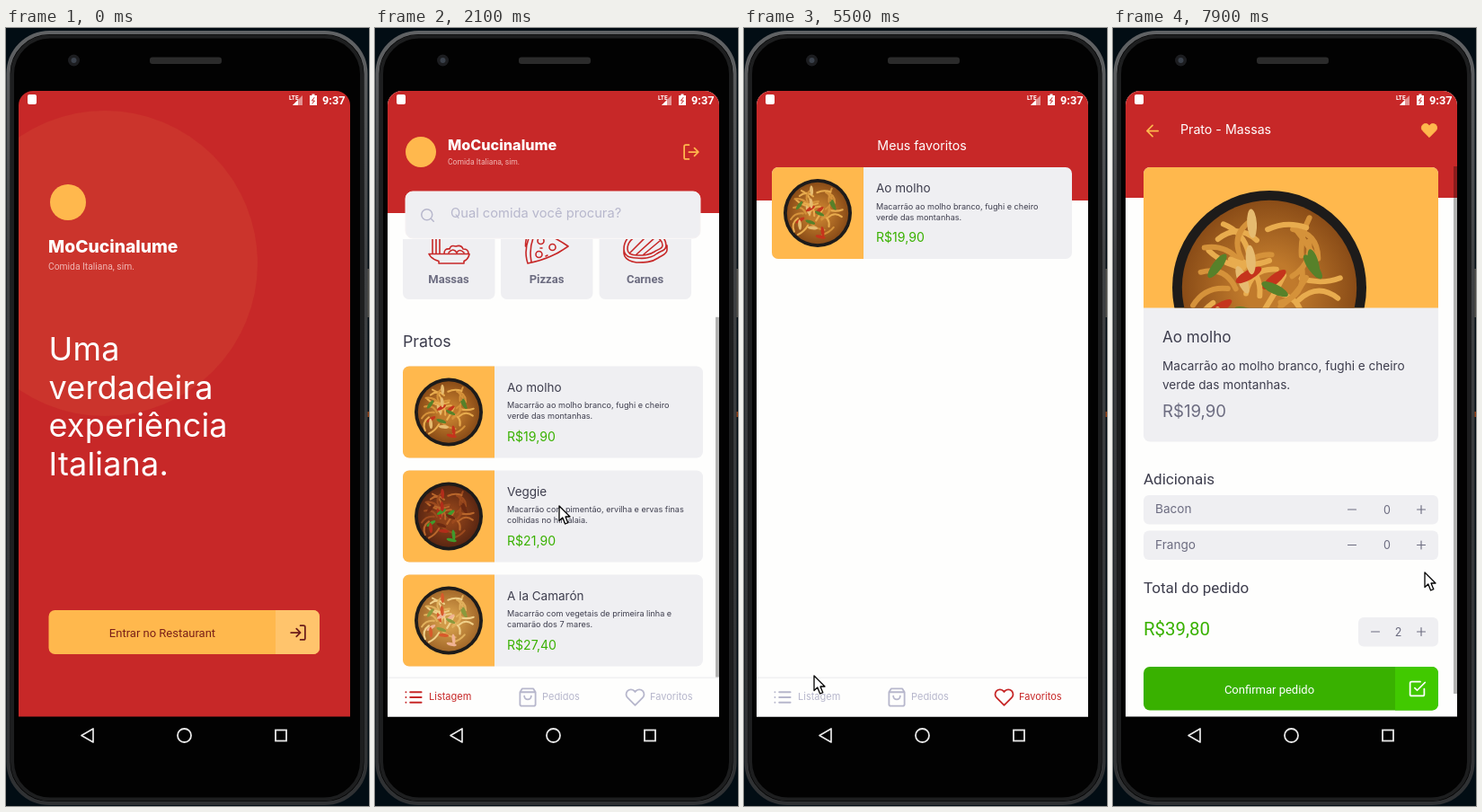
Recreate the animation shown at these times as an HTML page. Size 404 by 866 pixels, loop 8 s.

```html
<!DOCTYPE html>
<html lang="pt">
<head>
<meta charset="utf-8">
<title>Restaurante</title>
<style>
html, body { margin: 0; width: 100%; height: 100%; overflow: hidden; background: #020d14; }
svg { display: block; width: 404px; height: 866px; }
text { font-family: Inter, "Open Sans", sans-serif; white-space: pre; }
.r { font-family: Roboto, Arial, sans-serif; }
</style>
</head>
<body>
<svg id="stage" viewBox="0 0 404 866" xmlns="http://www.w3.org/2000/svg"></svg>
<script>
const RED = '#c72828', GOLD = '#ffb84d', GREY = '#efeff2', INK = '#3d3d4d',
      MUTED = '#6c6c80', PALE = '#b7b7cc', GREEN = '#39b100', PAPER = '#fefefd';
const BRAND = 'MoCucinalume';

// ---- drawing helpers ----
const rect = (x, y, w, h, fill, rx = 0, more = '') =>
  `<rect x="${x}" y="${y}" width="${w}" height="${h}" rx="${rx}" fill="${fill}" ${more}/>`;
const circle = (x, y, r, fill, more = '') =>
  `<circle cx="${x}" cy="${y}" r="${r}" fill="${fill}" ${more}/>`;
const text = (x, y, s, size, fill, more = '') =>
  `<text x="${x}" y="${y}" font-size="${size}" fill="${fill}" ${more}>${s}</text>`;
const roboto = (x, y, s, size, fill, more = '') => text(x, y, s, size, fill, 'class="r" ' + more);
const line = (d, color, width = 1.5, fill = 'none') =>
  `<path d="${d}" fill="${fill}" stroke="${color}" stroke-width="${width}" stroke-linecap="round" stroke-linejoin="round"/>`;
const group = (id, body, more = '') => `<g id="${id}" ${more}>${body}</g>`;
const scrollbar = (y, h, more = '') => rect(379, y, 4, h, '#000', 0, 'fill-opacity=".3" ' + more);
const MID = 'text-anchor="middle"';

const ICONS = {
  heart: 'M20.8 4.6a5.5 5.5 0 0 0-7.8 0L12 5.7l-1-1.1a5.5 5.5 0 0 0-7.8 7.8L12 21.2l8.8-8.8a5.5 5.5 0 0 0 0-7.8z',
  bag: 'M5.5 2L3 6v14a2 2 0 0 0 2 2h14a2 2 0 0 0 2-2V6l-2.5-4zM3 6h18M16 10.5a4 4 0 0 1-8 0',
  list: 'M8 6h13M8 12h13M8 18h13M3 6h.1M3 12h.1M3 18h.1',
  enter: 'M15 3h4a2 2 0 0 1 2 2v14a2 2 0 0 1-2 2h-4M10 17l5-5-5-5M15 12H3',
  leave: 'M9 21H5a2 2 0 0 1-2-2V5a2 2 0 0 1 2-2h4M16 17l5-5-5-5M21 12H9',
  find: 'M3 11a8 8 0 1 0 16 0a8 8 0 1 0-16 0M21 21l-4.3-4.3',
  back: 'M19 12H5M12 19l-7-7 7-7',
  check: 'M9 11l3 3L22 4M21 12v7a2 2 0 0 1-2 2H5a2 2 0 0 1-2-2V5a2 2 0 0 1 2-2h11',
  plus: 'M12 6v12M6 12h12',
  minus: 'M6 12h12'
};
function icon(name, cx, cy, size, color, fill = 'none', width = 2) {
  const k = size / 24;
  return `<g transform="translate(${cx - size / 2} ${cy - size / 2}) scale(${k})">${line(ICONS[name], color, width, fill)}</g>`;
}

function seeded(seed) {
  return () => (seed = (seed * 16807) % 2147483647) / 2147483647;
}

// base, shade, strands, toppings
const FOOD = {
  sauce: ['#c07a2c', '#8a4c17', ['#e8ac4e', '#d5923a'], ['#c5341c', '#e6bb70', '#57812a']],
  veg: ['#8c4119', '#5c2712', ['#b9662b', '#9c4a1e'], ['#3f9a2d', '#b22d1a', '#6b2a12']],
  shrimp: ['#d19a48', '#a4692a', ['#f0d08a', '#e1b05c'], ['#f0b394', '#d85a2b', '#8a9a3c']]
};
function plate(cx, cy, r, kind, seed) {
  const [, , strands, bits] = FOOD[kind], rnd = seeded(seed);
  const place = () => {
    const a = rnd() * 6.283, d = Math.sqrt(rnd()) * r * 0.74;
    return `transform="translate(${cx + d * Math.cos(a)} ${cy + d * Math.sin(a)}) rotate(${rnd() * 180})"`;
  };
  let s = circle(cx, cy, r, '#1d1b1a') + circle(cx, cy, r * 0.9, `url(#${kind})`);
  for (let i = 0; i < 26; i++) {
    const w = r * 0.2, q = w * (rnd() - 0.5) * 1.8;
    s += `<path d="M${-w} 0Q0 ${q} ${w} 0" ${place()} fill="none" stroke="${strands[i % 2]}" stroke-width="${r * 0.055}" stroke-linecap="round"/>`;
  }
  for (let i = 0; i < 15; i++) {
    s += `<ellipse rx="${r * 0.15}" ry="${r * 0.05}" ${place()} fill="${bits[i % 3]}"/>`;
  }
  return s;
}

const DISHES = {
  sauce: ['Ao molho', 'Macarrão ao molho branco, fughi e cheiro', 'verde das montanhas.', '19,90'],
  veg: ['Veggie', 'Macarrão com pimentão, ervilha e ervas finas', 'colhidas no himalaia.', '21,90'],
  shrimp: ['A la Camarón', 'Macarrão com vegetais de primeira linha e', 'camarão dos 7 mares.', '27,40']
};
function dish(y, kind, price) {
  const [name, a, b, cost] = DISHES[kind];
  return rect(31, y, 334, 102, GREY, 7) +
    `<path d="M133 ${y}H38a7 7 0 0 0-7 7v88a7 7 0 0 0 7 7h95z" fill="${GOLD}"/>` +
    plate(82, y + 51, 38, kind, 77) +
    text(147, y + 28, name, 13.5, INK) +
    text(147, y + 46.5, a, 9.1, INK) + text(147, y + 58.5, b, 9.1, INK) +
    text(147, y + 83, 'R$' + (price || cost), 14.1, GREEN);
}

function tabs(active) {
  const items = [['list', 43, 60, 'Listagem'], ['bag', 170, 186, 'Pedidos'], ['heart', 289.5, 306, 'Favoritos']];
  return rect(14, 722.5, 369, 2, '#f1f1f2') + rect(14, 724, 369, 43, PAPER) +
    items.map(([ic, x, tx, label], i) => {
      const c = i === active ? RED : PALE;
      return icon(ic, x, 745, 23, c, 'none', 1.9) + text(tx, 748, label, 11, c);
    }).join('');
}

const page = headEnd => rect(14, 70, 369, 697, PAPER) + rect(14, 70, 369, headEnd - 70, RED);

// ---- screens ----
const heading = ['Uma', 'verdadeira', 'experiência', 'Italiana.'];
const welcome = rect(14, 70, 369, 697, RED) +
  circle(110, 262, 170, '#cb342c') + circle(69, 194, 20, GOLD) +
  text(47, 250, BRAND, 19.3, '#fff', 'font-weight="800"') +
  roboto(47, 268.5, 'Comida Italiana, sim.', 10.3, '#f0b7b4') +
  heading.map((s, i) => text(47.5, 370 + i * 42.7, s, 36, '#fff', 'letter-spacing=".005em"')).join('') +
  group('enter', rect(47.5, 648, 301.5, 49, GOLD, 7) +
    '<path d="M300 648h42a7 7 0 0 1 7 7v35a7 7 0 0 1-7 7h-42z" fill="#ffc46c"/>' +
    roboto(174, 678, 'Entrar no Restaurant', 13, '#7a2018', MID) +
    icon('enter', 325, 673, 21, '#6b1d1a'));

const pasta = 'M59 332h13q5 0 8 1.5h25v3h-25q-3 2.5-8 2.5h-13M59 335.5h13M64 330v28M68 330v28M72 330v28M60 358.5h45q-1 6-6 8v2.5h-28v-2.5q-8-2-11-8zM77 358q0-6 6-5q1-5 7-3q6-2 8 3q6 0 6 5M82 357q5-6 9 0q3-5 8 0';
const pizza = 'M176 331q22 7 39 19q-19 14-45 19q-6-18 6-38zM179.5 334q-9 15-5.5 33M167.5 350q0-15 8.5-19M181 344a3.5 3.5 0 1 0 7 0a3.5 3.5 0 1 0-7 0M179 359a3.5 3.5 0 1 0 7 0a3.5 3.5 0 1 0-7 0M194 351a3.5 3.5 0 1 0 7 0a3.5 3.5 0 1 0-7 0M190 338l2 1M190 361l2-1M184 352h2';
const meat = 'M277 353c0-13 12-21 26-20c13 0 21 8 21 16c0 6-6 6-10 9c-6 5-14 6-23 5c-9 0-14-3-14-10zM277 353v5c1 7 7 9 14 10c9 0 17 0 24-5c4-3 10-4 10-9v-5M281 353c0-10 10-17 22-16c10 0 17 6 17 12c0 4-5 4-9 7c-6 4-12 4-19 4c-7 0-11-2-11-7zM284 357l19-19M291 359l21-19M299 359l18-15';
const category = (x, label, art, id) => group(id,
  rect(x, 307, 102.5, 102, GREY, 7, `id="${id}Box"`) + line(art, RED, 1.6) +
  roboto(x + 51, 391, label, 13, MUTED, MID + ' font-weight="700"'));

const home = page(206) + circle(51, 138, 17, GOLD) +
  text(81, 136, BRAND, 16.2, '#fff', 'font-weight="800"') +
  roboto(81, 152, 'Comida Italiana, sim.', 8.6, '#f0b7b4') +
  icon('leave', 352, 138, 21, GOLD) +
  rect(34, 182, 328, 52, GREY, 8, 'stroke="#f5f1f1"') +
  icon('find', 58.5, 208.5, 18, PALE) +
  text(84, 211, 'Qual comida você procura?', 14.7, PALE) +
  '<g clip-path="url(#scroll)">' + group('list',
    text(31, 286, 'Categorias', 17.8, INK) +
    group('cats', category(31, 'Massas', pasta, 'massas') + category(140, 'Pizzas', pizza, 'pizzas') +
      category(249.5, 'Carnes', meat, 'carnes')) +
    text(31, 462, 'Pratos', 17.8, INK) +
    group('all', dish(483.5, 'sauce') + dish(599.5, 'veg') + dish(715.5, 'shrimp')) +
    group('only', dish(483.5, 'veg'))) + '</g>' +
  scrollbar(234, 402, 'id="bar"') + tabs(0);

const title = s => text(198, 136, s, 14.2, '#fff', MID);
const orders = page(192) + title('Meus pedidos') +
  group('orderRows', dish(155, 'sauce', '23,40') + dish(271.5, 'veg') + dish(387.5, 'shrimp') + dish(503.5, 'shrimp', '53,30')) + tabs(1);
const favs = page(192) + title('Meus favoritos') + group('favRows', dish(155, 'sauce')) + tabs(2);

const counter = (y, x0, xn, n, id) => icon('minus', x0, y, 18, MUTED, 'none', 1.5) +
  text(xn, y + 4.5, n, 12.5, MUTED, `${MID} id="${id}"`) + icon('plus', 343, y, 18, MUTED, 'none', 1.5);
const extra = (y, label, id) => rect(34, y, 328, 32.5, GREY, 6) +
  text(47, y + 20, label, 13.6, MUTED) + counter(y + 16, 266, 305, 0, id);
const [name, desc1, desc2, cost] = DISHES.sauce;
const detail = page(189) + icon('back', 44, 114.5, 21, GOLD) +
  text(75, 118, 'Prato - Massas', 14.2, '#fff') +
  group('like', icon('heart', 352, 114, 20, GOLD, 'none', 2.3)) +
  group('liked', icon('heart', 352, 114, 20, GOLD, GOLD, 1)) +
  rect(34, 155, 328, 305.5, GREY, 7) +
  `<path d="M34 311.5V162a7 7 0 0 1 7-7h314a7 7 0 0 1 7 7v149.5z" fill="${GOLD}"/>` +
  '<g clip-path="url(#photo)">' + plate(174, 289, 108, 'sauce', 77) + '</g>' +
  text(55, 350, name, 17.1, INK) + text(55, 380.5, desc1, 13.6, INK) + text(55, 402, desc2, 13.6, INK) +
  text(55, 433, 'R$' + cost, 18.6, MUTED) +
  roboto(34, 507.5, 'Adicionais', 17, INK) + extra(520, 'Bacon', 'bacon') + extra(559.5, 'Frango', 'frango') +
  roboto(34, 628.5, 'Total do pedido', 17, INK) +
  roboto(34, 675.5, '', 20.4, GREEN, 'id="total"') +
  rect(273, 656, 89, 32.5, GREY, 6) + counter(672, 292, 317.5, 1, 'qty') +
  rect(34, 711, 328, 48.5, GREEN, 7) +
  '<path d="M314 711h41a7 7 0 0 1 7 7v34.5a7 7 0 0 1-7 7h-41z" fill="#41c900"/>' +
  roboto(174, 741, 'Confirmar pedido', 13, '#fff', MID) + icon('check', 338.5, 735.5, 21, '#fff') +
  scrollbar(154, 587);

const status = rect(24, 74, 10, 11, '#fff', 2) +
  roboto(315, 79.5, 'LTE', 6.5, '#fff', 'font-weight="700"') +
  '<path d="M319 86L330 75V86z" fill="#e39393"/><path d="M319 86l6-6v6z" fill="#fff"/>' +
  '<path d="M338 75h2.5v-1.5h3V75h2.5v11h-8z" fill="#fff"/>' + line('M343 77.5l-2.5 3.5h3l-2.5 3', RED, 1) +
  roboto(352, 84.5, '9:37', 12.8, '#fff', 'font-weight="700"');

const phone = rect(0, 0, 404, 866, '#020d14') +
  rect(401, 268, 3, 54, '#4c4c48') + rect(401, 427, 3, 6, '#8a3a10') +
  rect(2.5, 5, 398, 858, '#000', 46, 'stroke="url(#metal)" stroke-width="4"') +
  rect(7, 9.5, 389, 849, '#020202', 42, 'stroke="#1d1e1f" stroke-width="4"') +
  rect(160, 32.5, 80, 7.5, '#2b2b2b', 3) +
  circle(75.5, 36, 6.5, '#1c1d20') + circle(75.5, 36, 3, '#3a414b') +
  line('M97 780v15l-13-7.5z', '#e8e8e8', 1.7) + circle(198.5, 787.5, 7.5, 'none', 'stroke="#e8e8e8" stroke-width="1.8"') +
  rect(300, 781.5, 12, 12, 'none', 0, 'stroke="#e8e8e8" stroke-width="1.8"');

const gradients = Object.entries(FOOD).map(([k, [base, shade]]) =>
  `<radialGradient id="${k}"><stop offset=".3" stop-color="${base}"/><stop offset="1" stop-color="${shade}"/></radialGradient>`).join('');
const clip = (id, body) => `<clipPath id="${id}">${body}</clipPath>`;

document.getElementById('stage').innerHTML = '<defs>' + gradients +
  '<linearGradient id="metal" x2="0" y2="1"><stop stop-color="#606264"/><stop offset=".3" stop-color="#3f4143"/><stop offset="1" stop-color="#2f3133"/></linearGradient>' +
  clip('glass', '<path d="M14 766.5V86a16 16 0 0 1 16-16h337a16 16 0 0 1 16 16v680.5z"/>') +
  clip('scroll', rect(14, 235, 369, 489, '#000')) + clip('photo', rect(34, 155, 328, 156.5, '#000')) + '</defs>' +
  phone + '<g clip-path="url(#glass)">' +
  group('welcome', welcome) + group('home', home) + group('orders', orders) + group('favs', favs) + group('detail', detail) +
  status + '</g>' +
  group('cursor', '<path d="M0 0V16.5L3.8 13L6.6 20L9.8 18.7L7 12H12z" fill="#fff" stroke="#000" stroke-width="1.3" stroke-linejoin="round"/>');

// ---- motion: rows of time, values ----
const POINTER = [[0, 420, 0], [100, 391, 24], [300, 322, 330], [600, 206, 655], [1200, 206, 655], [1500, 205, 639],
  [1600, 205, 639], [2000, 205, 532], [2100, 205, 532], [2500, 205, 639], [2800, 180, 340], [3200, 175, 332],
  [3400, 175, 332], [3800, 196, 742], [4000, 196, 742], [4200, 254, 750], [4600, 300, 747], [4700, 300, 747],
  [5200, 80, 735], [5400, 79, 735], [5500, 78, 721], [6200, 110, 525], [6400, 110, 525], [6700, 201, 560],
  [6900, 347, 108], [7000, 347, 108], [7300, 344, 683], [7500, 342, 672], [7700, 342, 672], [7900, 347, 606]];
const SCROLL = [[1600, 0], [2000, 107], [2100, 107], [2500, 0]];
const HOME_IN = [[700, 0], [800, .2], [1000, .9], [1100, 1]];
const DETAIL_IN = [[6400, 0], [6500, .4], [6600, .9], [6700, 1]];

function at(track, t) {
  const i = track.findIndex(k => k[0] >= t);
  if (i < 0) return track[track.length - 1].slice(1);
  if (i === 0) return track[0].slice(1);
  const a = track[i - 1], b = track[i], u = (t - a[0]) / (b[0] - a[0]);
  return a.slice(1).map((v, j) => v + (b[j + 1] - v) * u);
}

const el = id => document.getElementById(id);
const set = (id, key, value) => el(id).setAttribute(key, value);
const show = (id, on) => set(id, 'display', on ? 'inline' : 'none');
const move = (id, x, y) => set(id, 'transform', `translate(${x} ${y})`);
const within = (t, a, b) => t >= a && t < b;

function render(t) {
  const [homeIn] = at(HOME_IN, t), [detailIn] = at(DETAIL_IN, t), [scroll] = at(SCROLL, t);
  show('welcome', t < 1100);
  set('enter', 'opacity', within(t, 600, 800) ? .5 : 1);
  show('home', within(t, 800, 4100) || within(t, 5600, 6700));
  set('home', 'opacity', homeIn);
  move('home', 0, (1 - homeIn) * 40);
  show('cats', t >= 1200);
  show('orders', within(t, 4100, 4800));
  show('orderRows', t >= 4200);
  show('favs', within(t, 4800, 5600));
  show('favRows', t >= 4900);
  show('detail', t >= 6500);
  set('detail', 'opacity', detailIn);
  move('detail', 0, (1 - detailIn) * 40);

  move('list', 0, -scroll);
  set('bar', 'y', 234 + scroll * 402 / 490);
  show('bar', within(t, 1300, 2800));
  const chosen = within(t, 2900, 3300), filtered = within(t, 3000, 3500);
  show('all', t >= 1300 && !filtered);
  show('only', filtered);
  set('pizzasBox', 'fill', chosen ? '#fff0e8' : GREY);
  set('pizzasBox', 'stroke', chosen ? RED : 'none');
  set('pizzasBox', 'stroke-width', 2);
  set('pizzas', 'opacity', within(t, 2800, 3000) || within(t, 3200, 3300) ? .62 : 1);

  const liked = t >= 7000, count = t >= 7700 ? 2 : 1;
  show('like', !liked);
  show('liked', liked);
  el('qty').textContent = count;
  el('total').textContent = 'R$' + (19.9 * count).toFixed(2).replace('.', ',');

  show('cursor', t >= 100);
  move('cursor', ...at(POINTER, t));
}

const start = performance.now();
function tick() {
  const t = (performance.now() - start) % 8000;
  render(Math.floor(t / 100) * 100);
  requestAnimationFrame(tick);
}
tick();
</script>
</body>
</html>
```
